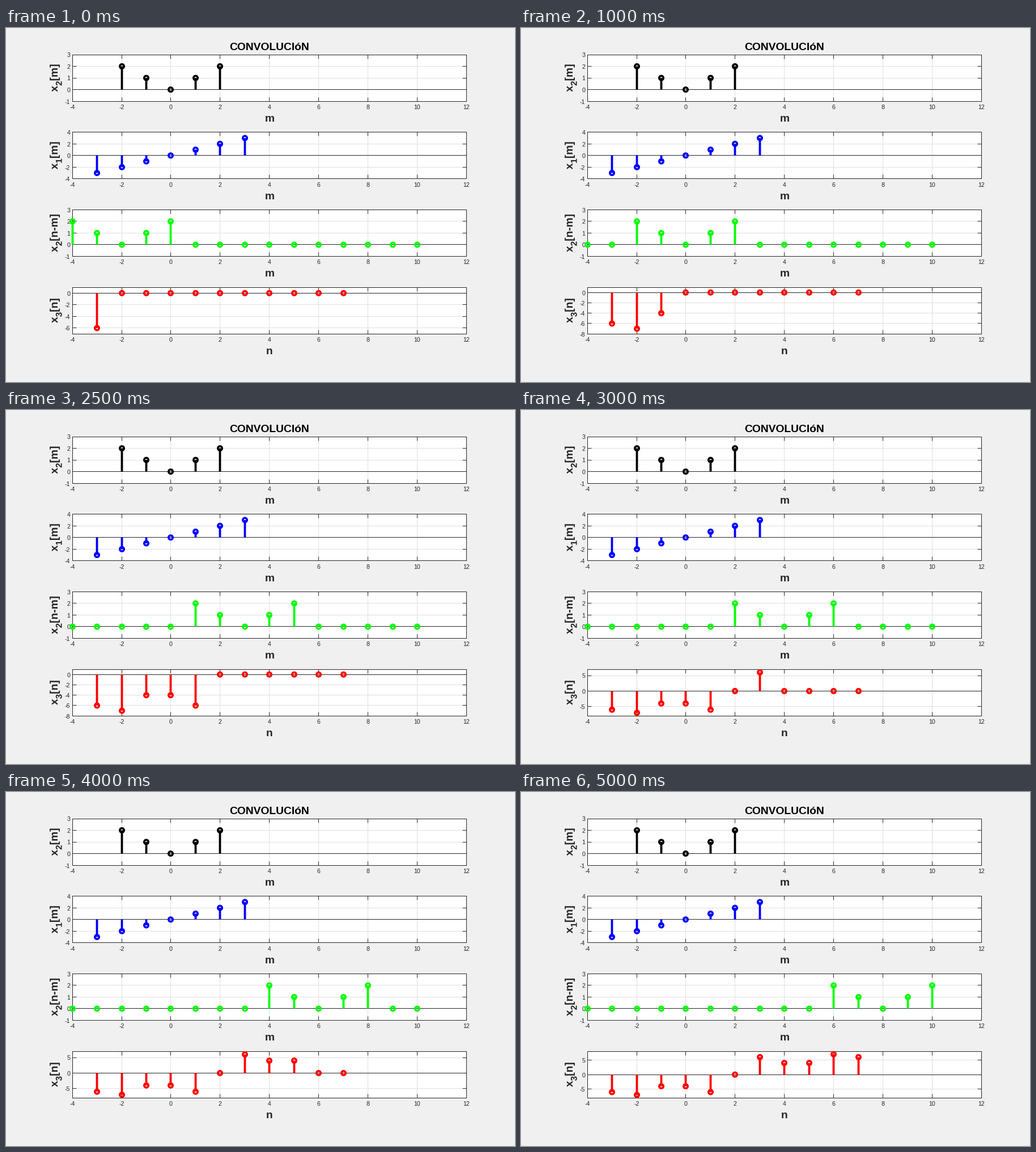
Recreate the animation shown at these times as a matplotlib script. Size 898 px wide and 624 px high, loop 5.5 s.

```python
import numpy as np
import matplotlib.pyplot as plt
from matplotlib.animation import FuncAnimation
from matplotlib.patches import Circle, PathPatch, Rectangle
from matplotlib.textpath import TextPath
from matplotlib.transforms import Affine2D

W, H, DPI = 898, 624, 64
PT = 72 / DPI  # points per pixel
INK, GRID = "#262626", "#dfdfdf"
FONT = "Liberation Sans"
LEFT, UNIT = 117.05, 43.475
TOP, STEP, HEIGHT = 47.0, 136.7, 82.1
TICK, LABEL = 10.67, 19.2
FRAMES = 11

fig = plt.figure(figsize=(W / DPI, H / DPI), dpi=DPI, facecolor="#f0f0f0")
ax = fig.add_axes([0, 0, 1, 1])

x1 = np.arange(-3, 4)
x2 = np.abs(np.arange(-2, 3))
x3 = np.convolve(x1, x2)


def center(v):
    """Middle of the pixel that holds v."""
    return np.floor(v) + 0.5


def px(m):
    return center(LEFT + (m + 4) * UNIT)


def line(xs, ys, color=INK, z=2.0, width=1, cap="butt"):
    ax.plot(xs, ys, color=color, lw=width * PT, zorder=z, snap=False,
            solid_capstyle=cap, solid_joinstyle="miter")


def text(x, y, s, size, bold=False, color=INK, ha="center"):
    ax.text(x, y, s, fontsize=size * PT, family=FONT, color=color, ha=ha,
            weight="bold" if bold else "normal", va="baseline")


def glyphs(s, size):
    return TextPath((0, 0), s, size=size,
                    prop={"family": FONT, "weight": "bold"})


def advance(s, size):
    def ink(t):
        return glyphs(t, size).get_extents().width
    return ink("|" + s + "|") - ink("||")


def ylabel(mid, sub, rest):
    parts = [("x", LABEL, 91), (sub, 0.8 * LABEL, 98.5), (rest, LABEL, 91)]
    widths = [advance(s, size) for s, size, _ in parts]
    y = mid + sum(widths) / 2
    for (s, size, x), w in zip(parts, widths):
        # The y axis points down, so mirror before turning upwards.
        place = Affine2D().scale(1, -1).rotate_deg(-90).translate(x, y)
        ax.add_patch(PathPatch(place.transform_path(glyphs(s, size)),
                               fc=INK, lw=0, zorder=3))
        y -= w


def panel(row, lo, hi, step, ms, vals, color, sub, rest, xname="m"):
    top = TOP + row * STEP
    bottom = top + HEIGHT
    left, right = px(-4), px(12)
    t, b = center(top), center(bottom)

    def py(v):
        return top + (hi - v) / (hi - lo) * HEIGHT

    ax.add_patch(Rectangle((left, t), right - left, b - t, color="white", lw=0))
    for m in range(-4, 13, 2):
        x = px(m)
        line([x, x], [t, b], GRID)
        line([x, x], [t, t + 7], z=2.2)
        line([x, x], [b, b - 7], z=2.2)
        text(x, bottom + 14, str(m), TICK)
    for v in range(-(-lo // step) * step, hi + 1, step):
        y = center(py(v))
        line([left, right], [y, y], GRID)
        line([left, left + 7], [y, y], z=2.2)
        line([right, right - 7], [y, y], z=2.2)
        text(113.3, py(v) + 4.4, str(v), TICK, ha="right")
    line([left, right, right, left, left], [t, t, b, b, t], z=2.3,
         cap="projecting")
    base = center(py(0))
    line([left, right], [base, base], z=2.3)

    for m, v in zip(ms, vals):
        x, y = px(m), py(v)
        if v:
            line([x, x], [base, y], color, z=4, width=3.8)
        ax.add_patch(Circle((x, y), 3.7, fill=False, ec=color, lw=3.6 * PT,
                            zorder=5))
    text((left + right) / 2, bottom + 36, xname, LABEL, True)
    ylabel((top + bottom) / 2, sub, rest)


def draw(k):
    ax.cla()
    ax.set_xlim(0, W)
    ax.set_ylim(H, 0)
    ax.set_axis_off()
    text((px(-4) + px(12)) / 2, 39, "CONVOLUCIóN", LABEL, True, "black")

    panel(0, -1, 3, 1, range(-2, 3), x2, "black", "2", "[m]")
    panel(1, -4, 4, 2, x1, x1, "blue", "1", "[m]")

    m = np.arange(-4, 11)
    shifted = np.zeros(len(m), int)
    shifted[k:k + 5] = x2[::-1]
    panel(2, -1, 3, 1, m, shifted, "lime", "2", "[n-m]")

    result = np.where(np.arange(FRAMES) <= k, x3, 0)
    lo, hi = int(result.min()) - 1, int(result.max()) + 1
    panel(3, lo, hi, 2 if hi - lo < 10 else 5, np.arange(-3, 8), result,
          "red", "3", "[n]", "n")


anim = FuncAnimation(fig, draw, frames=FRAMES, interval=500, repeat=True,
                     repeat_delay=0)
plt.show()
```
